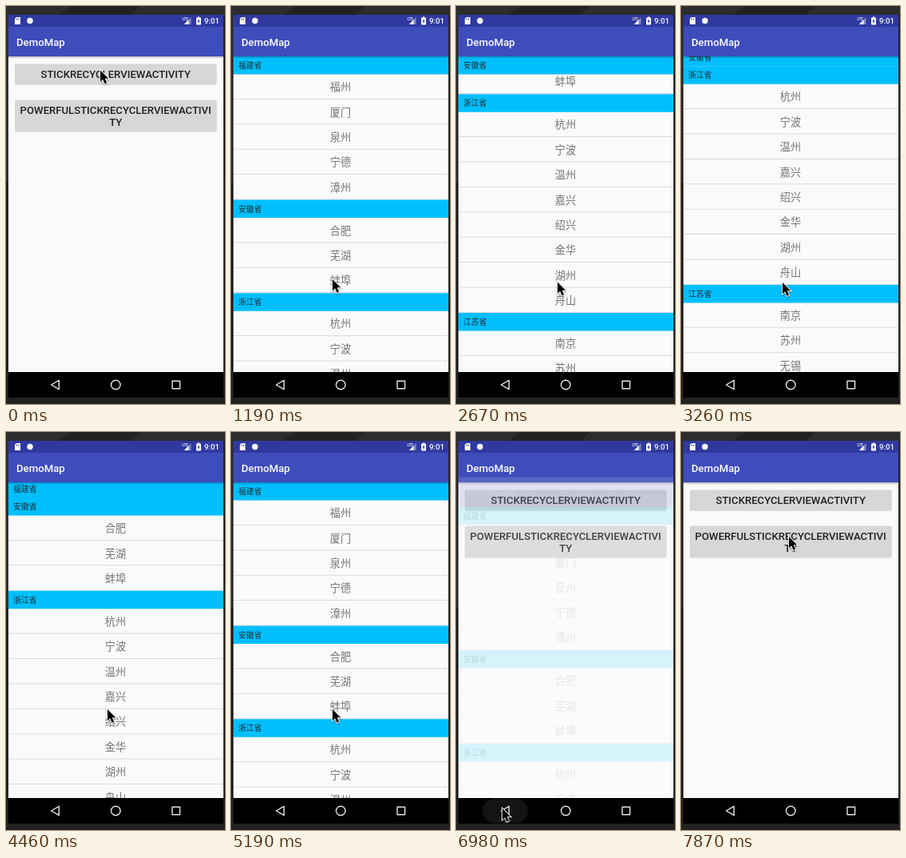
Write an HTML page with a canvas that moves like this. It is 274 by 498 pixels and loops after 8 s.

```html
<!DOCTYPE html>
<html lang="zh-CN">
<head>
<meta charset="utf-8">
<title>Sticky list demo</title>
<style>
  html, body { margin: 0; width: 274px; height: 498px; overflow: hidden; background: #222; }
  canvas { display: block; width: 274px; height: 498px; }
</style>
</head>
<body>
<canvas id="stage"></canvas>
<script>
const canvas = document.getElementById('stage');
const ctx = canvas.getContext('2d');
const ratio = window.devicePixelRatio || 1;
canvas.width = 274 * ratio;
canvas.height = 498 * ratio;

const LOOP = 8000, TICKS = 54;
const LEFT = 3, RIGHT = 272, WIDTH = RIGHT - LEFT;
const TOP = 63, BOTTOM = 458, HEADER = 22.5, ROW = 31.4;
const LATIN = 'Roboto, sans-serif';
const CHINESE = '"Noto Sans CJK SC", "Noto Sans CJK", sans-serif';

const sections = [
  ['福建省', '福州 厦门 泉州 宁德 漳州'],
  ['安徽省', '合肥 芜湖 蚌埠'],
  ['浙江省', '杭州 宁波 温州 嘉兴 绍兴 金华 湖州 舟山'],
  ['江苏省', '南京 苏州 无锡 南通 扬州'],
].map(([name, cities]) => ({ name, cities: cities.split(' ') }));
let offset = TOP;
for (const s of sections) {
  s.top = offset;
  offset += HEADER + s.cities.length * ROW;
}

// Keys are [tick, value, value...]
const scrollKeys = [[8, 0], [10, 18], [14, 98.5], [18, 249], [20, 300], [21, 300], [22, 284],
  [24, 180], [29, 180], [30, 160.5], [32, 75], [35, 0]];
const cursorKeys = [[6, 118, 80.5], [8, 127, 342], [14, 127, 345], [30, 127, 347], [36, 127, 347],
  [38, 86, 175], [40, 84, 259], [44, 58, 471], [49, 58, 471], [50, 82, 385], [52, 139, 52], [53, 135, 131]];
const pageKeys = [[2, 0], [3, .5], [4, .9], [5, 1], [45, 1], [46, .6], [47, .15], [48, 0]];
const glowKeys = [[37, 0], [40, 1], [44, 0]];
const tapKeys = [[0, 0], [1, .5], [2, 1], [4, 0]];
const backKeys = [[44, 0], [45, 1], [46, .7], [48, 0]];

function at(keys, t) {
  const i = keys.findIndex(k => k[0] > t);
  if (i === 0) return keys[0].slice(1);
  if (i < 0) return keys[keys.length - 1].slice(1);
  const a = keys[i - 1], b = keys[i], u = (t - a[0]) / (b[0] - a[0]);
  return a.slice(1).map((v, j) => v + (b[j + 1] - v) * u);
}

function box(color, x, y, w, h, r = 0) {
  ctx.fillStyle = color;
  ctx.beginPath();
  ctx.roundRect(x, y, w, h, r);
  ctx.fill();
}

function disc(color, x, y, r) {
  ctx.fillStyle = color;
  ctx.beginPath();
  ctx.arc(x, y, r, 0, 7);
  ctx.fill();
}

function shape(points) {
  ctx.beginPath();
  for (let i = 0; i < points.length; i += 2) ctx.lineTo(points[i], points[i + 1]);
  ctx.closePath();
}

function text(str, x, y, font, color, align = 'left') {
  ctx.font = font;
  ctx.fillStyle = color;
  ctx.textAlign = align;
  ctx.fillText(str, x, y);
}

function clipped(x, y, w, h, draw) {
  ctx.save();
  ctx.beginPath();
  ctx.rect(x, y, w, h);
  ctx.clip();
  draw();
  ctx.restore();
}

function toolbar() {
  box('#3f4dbb', LEFT, 26, WIDTH, 37);
  text('DemoMap', 13, 49.5, `500 13.2px ${LATIN}`, '#fff');
  const shade = ctx.createLinearGradient(0, 63, 0, 66);
  shade.addColorStop(0, 'rgba(0,0,0,.28)');
  shade.addColorStop(1, 'rgba(0,0,0,0)');
  box(shade, LEFT, 63, WIDTH, 3);
}

function button(y, h, lines) {
  box('rgba(0,0,0,.12)', 11, y + .5, 252.5, h + .7, 2);
  box('#d6d7d7', 11, y, 252.5, h, 1.5);
  lines.forEach((line, i) =>
    text(line, 137.2, y + 17.4 + i * 15.4, `500 13.15px ${LATIN}`, '#212121', 'center'));
}

function menuPage(t) {
  box('#fafafa', LEFT, 26, WIDTH, BOTTOM - 26);
  toolbar();
  button(72.5, 25.3, ['STICKRECYCLERVIEWACTIVITY']);
  button(117.5, 39, ['POWERFULSTICKRECYCLERVIEWACTIVI', 'TY']);
  const [tap] = at(tapKeys, t);
  if (tap) clipped(11, 72.5, 252.5, 25.3, () => disc(`rgba(0,0,0,${.13 * tap})`, 118, 81, 40 + t * 50));
}

function listPage(t) {
  const [scroll] = at(scrollKeys, t);
  const [glow] = at(glowKeys, t);
  box('#fafafa', LEFT, 26, WIDTH, BOTTOM - 26);
  clipped(LEFT, TOP, WIDTH, BOTTOM - TOP, () => {
    for (const s of sections) s.cities.forEach((city, i) => {
      const y = s.top + HEADER + i * ROW - scroll;
      text(city, 137, y + 20.6, `13.2px ${CHINESE}`, '#757575', 'center');
      box('#dadada', LEFT, y + ROW - 1, WIDTH, 1);
    });
    sections.forEach((s, i) => {
      const next = sections[i + 1];
      let y = Math.max(TOP, s.top - scroll);
      if (next) y = Math.min(y, next.top - scroll - HEADER);
      box('#00bfff', LEFT, y, WIDTH, HEADER);
      text(s.name, 9.3, y + 15.2, `9.7px ${CHINESE}`, '#202a30');
    });
    if (glow) disc(`rgba(63,77,187,${.15 * glow})`, 118, 95 - 400 - (1 - glow) * 14, 400);
  });
  toolbar();
}

function statusBar() {
  box('#3039a0', LEFT, 11, WIDTH, 15);
  ctx.fillStyle = '#fff';
  shape([13, 14, 18, 14, 18, 23, 11, 23, 11, 16]);
  ctx.fill();
  box('#3039a0', 13, 15.5, .9, 2);
  box('#3039a0', 15, 15.5, .9, 2);
  disc('#fff', 30, 18.5, 3.7);
  text('LTE', 220.5, 17.5, `500 4.5px ${LATIN}`, '#fff');
  ctx.fillStyle = 'rgba(255,255,255,.4)';
  shape([231.5, 14, 231.5, 23, 223, 23]);
  ctx.fill();
  ctx.fillStyle = '#fff';
  shape([228.5, 17, 228.5, 23, 223, 23]);
  ctx.fill();
  box('#fff', 238, 14.5, 6, 9, .8);
  box('#fff', 239.8, 13.5, 2.4, 2);
  ctx.fillStyle = '#3039a0';
  shape([241.6, 15.8, 239.3, 19.4, 240.7, 19.4, 240.4, 22.2, 242.7, 18.5, 241.3, 18.5]);
  ctx.fill();
  text('9:01', 248, 22.2, `500 9.6px ${LATIN}`, '#fff');
}

function navBar(t) {
  box('#000', LEFT, BOTTOM, WIDTH, 32);
  const [press] = at(backKeys, t);
  if (press) box(`rgba(255,255,255,${.22 * press})`, 33, 459, 57, 30, 15);
  ctx.strokeStyle = '#e4e4e4';
  ctx.lineWidth = 1.4;
  ctx.lineJoin = 'round';
  shape([56.5, 474, 66.3, 468.4, 66.3, 479.6]);
  ctx.stroke();
  ctx.beginPath();
  ctx.arc(137.3, 474, 5.8, 0, 7);
  ctx.stroke();
  ctx.strokeRect(208, 469.2, 9.6, 9.6);
}

function backdrop() {
  box('#222', 0, 0, 274, 498);
  ctx.fillStyle = '#2d2d2d';
  shape([0, 0, 80, 0, 66, 11, 0, 11]);
  ctx.fill();
  shape([168, 0, 274, 0, 274, 11, 156, 11]);
  ctx.fill();
  box('#2f2f2f', 0, 0, LEFT, 220);
}

function cursor(t) {
  const [x, y] = at(cursorKeys, t);
  ctx.save();
  ctx.translate(x, y);
  shape([0, 0, 0, 14.2, 3.2, 11.2, 5.6, 16.8, 8.2, 15.7, 5.8, 10.3, 10.2, 10.3]);
  ctx.lineJoin = 'miter';
  ctx.lineWidth = 1.8;
  ctx.strokeStyle = '#fff';
  ctx.shadowColor = 'rgba(0,0,0,.4)';
  ctx.shadowBlur = 2 * ratio;
  ctx.shadowOffsetY = ratio;
  ctx.stroke();
  ctx.shadowColor = 'transparent';
  ctx.fillStyle = '#000';
  ctx.fill();
  ctx.restore();
}

function render(t) {
  ctx.setTransform(ratio, 0, 0, ratio, 0, 0);
  backdrop();
  const [shown] = at(pageKeys, t);
  clipped(LEFT, 26, WIDTH, BOTTOM - 26, () => {
    if (shown < 1) menuPage(t);
    if (shown > 0) {
      ctx.globalAlpha = shown;
      ctx.translate(0, (1 - shown) * 36);
      listPage(t);
    }
  });
  statusBar();
  navBar(t);
  cursor(t);
}

const start = performance.now();
function loop() {
  render(Math.floor((performance.now() - start) % LOOP * TICKS / LOOP));
  requestAnimationFrame(loop);
}
loop();
</script>
</body>
</html>
```
